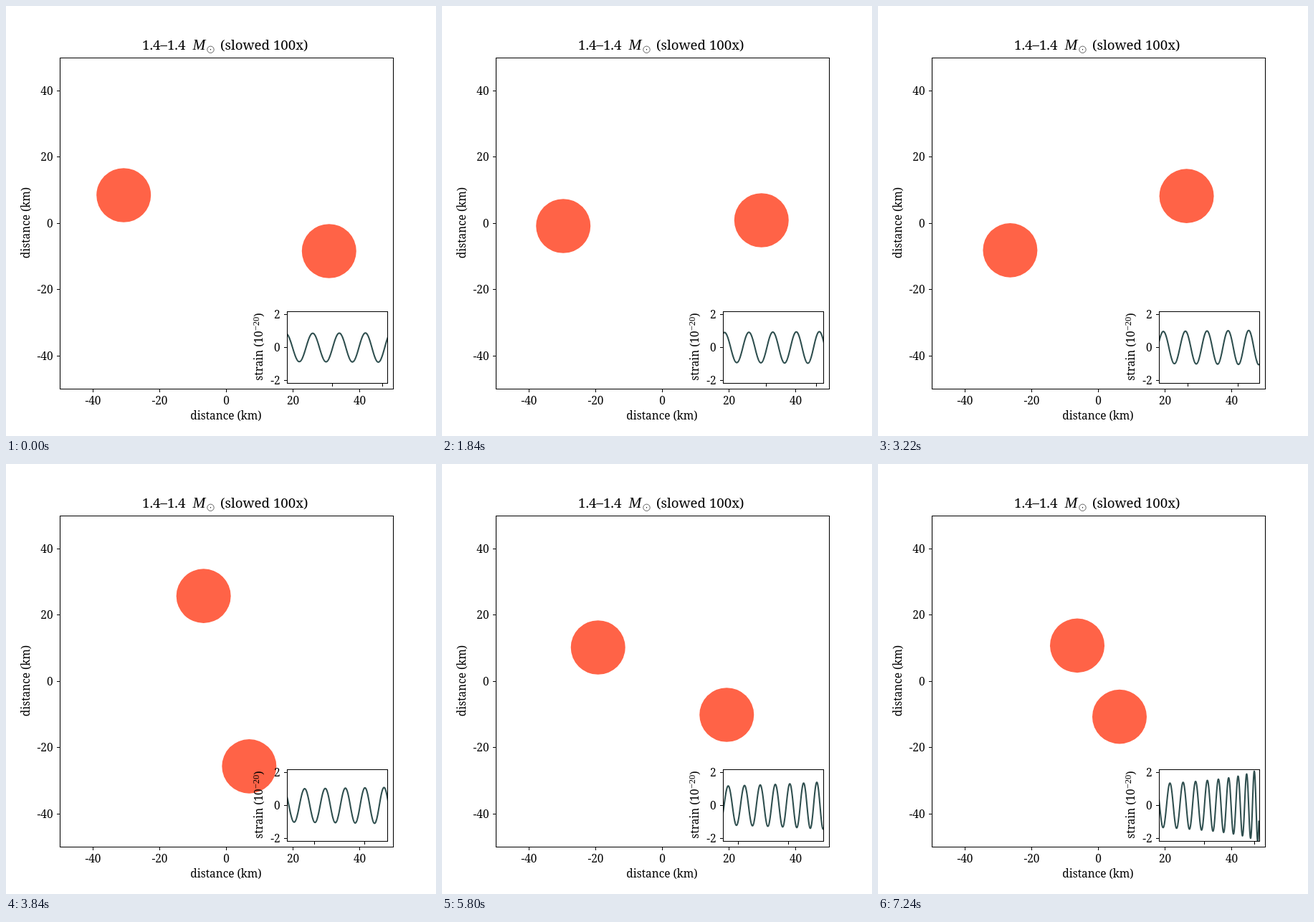
Animation of 600 by 600 pixels, one loop 7260 ms. Source, as an HTML page:

```html
<!DOCTYPE html>
<html>
<head>
<meta charset="utf-8">
<style>
html, body { margin: 0; width: 100%; height: 100%; overflow: hidden; background: #fff; }
svg { display: block; width: 600px; height: 600px; }
text { font-family: "Noto Serif", serif; font-size: 15.4px; }
.title { font-size: 18.7px; }
.math { font-family: "Liberation Serif", serif; }
.axis { fill: none; stroke: #000; stroke-width: 1.05; }
</style>
</head>
<body>
<svg viewBox="0 0 600 600">
  <text class="title" x="190" y="61">1.4–1.4</text>
  <text class="math" x="260.5" y="61" style="font-size:21.5px;font-style:italic">M</text>
  <circle cx="285.5" cy="60.8" r="4.7" fill="none" stroke="#000" stroke-width=".6"/>
  <circle cx="285.5" cy="60.8" r=".7"/>
  <text class="title" x="421.5" y="61" text-anchor="end">(slowed 100x)</text>
  <text x="307" y="577" text-anchor="middle">distance (km)</text>
  <text transform="translate(32.5 302.5) rotate(-90)" text-anchor="middle">distance (km)</text>
  <g id="main"></g>
  <path class="axis" d="M75.5 72.5H540.5V534.5H75.5Z"/>

  <g fill="#ff6347">
    <ellipse id="starA" rx="38" ry="37.8"/>
    <ellipse id="starB" rx="38" ry="37.8"/>
  </g>

  <clipPath id="clip"><rect x="392.5" y="426.5" width="140" height="100"/></clipPath>
  <rect x="392.5" y="426.5" width="140" height="100" fill="#fff"/>
  <path id="timeTicks" class="axis"/>
  <path id="wave" clip-path="url(#clip)" fill="none" stroke="#2f4f4f" stroke-width="2.08" stroke-linejoin="round"/>
  <path class="axis" d="M392.5 426.5H532.5V526.5H392.5Z"/>
  <g id="inset"></g>
  <text transform="translate(358 475.5) rotate(-90)" text-anchor="middle">strain (10<tspan class="math" dy="-5.5" style="font-size:12.5px">−20</tspan><tspan dy="5.5">)</tspan></text>
</svg>
<script>
const $ = id => document.getElementById(id);
const LOOP = 7260, STEP = 20;
const MERGE = 7412.6;               // time at which the separation would reach zero
const R0 = 31.95, PHASE0 = 164.68, SPEED = 0.5663;  // km, degrees, degrees per ms
const MID = 461.9, PX_PER_MS = 0.1158, SCROLL_END = 6640, DATA_END = 7242;
const TICK0 = -56, TICK_GAP = 604;

const radius = t => R0 * (1 - t / MERGE) ** 0.25;
const angle = t => (PHASE0 + SPEED * 1.6 * MERGE * (1 - (1 - t / MERGE) ** 0.625)) * Math.PI / 180;
const strainY = t => 476.5 - 640 / radius(t) * Math.cos(2 * angle(t));

const yTick = (x, y, label) =>
  `<path class="axis" d="M${x} ${y}h-4.5"/><text x="${x - 10}" y="${y + 5.5}" text-anchor="end">${label}</text>`;
const xTick = (x, y, label) =>
  `<path class="axis" d="M${x} ${y}v4.5"/><text x="${x}" y="${y + 21.5}" text-anchor="middle">${label}</text>`;

for (let km = -40; km <= 40; km += 20) {
  $('main').innerHTML += xTick(307.5 + 4.65 * km, 534.5, km) +
    yTick(75.5, Math.floor(303.2 - 4.62 * km) + 0.5, km);
}
for (const v of [-2, 0, 2]) $('inset').innerHTML += yTick(392.5, 476.5 - 23 * v, v);

function place(star, side, t) {
  const r = side * radius(t), a = angle(t);
  star.setAttribute('cx', 307.5 + 4.65 * r * Math.cos(a));
  star.setAttribute('cy', 303 - 4.62 * r * Math.sin(a));
}

function drawInset(t) {
  const now = Math.min(t, SCROLL_END);
  const points = [];
  for (let x = 391; x <= 534; x += 0.25) {
    const time = now + (x - MID) / PX_PER_MS;
    if (time > DATA_END) break;
    points.push(x + ' ' + strainY(time).toFixed(2));
  }
  $('wave').setAttribute('d', 'M' + points.join('L'));

  let ticks = '';
  for (let n = 0; n < 14; n++) {
    const x = MID + (TICK0 + n * TICK_GAP - now) * PX_PER_MS;
    if (x >= 392.5 && x <= 532.5) ticks += `M${Math.floor(x) + 0.5} 526.5v4.5`;
  }
  $('timeTicks').setAttribute('d', ticks);
}

const start = performance.now();
function frame() {
  const elapsed = (performance.now() - start) % LOOP;
  const t = Math.floor(elapsed / STEP) * STEP;
  place($('starA'), 1, t);
  place($('starB'), -1, t);
  drawInset(t);
  requestAnimationFrame(frame);
}
frame();
</script>
</body>
</html>
```
